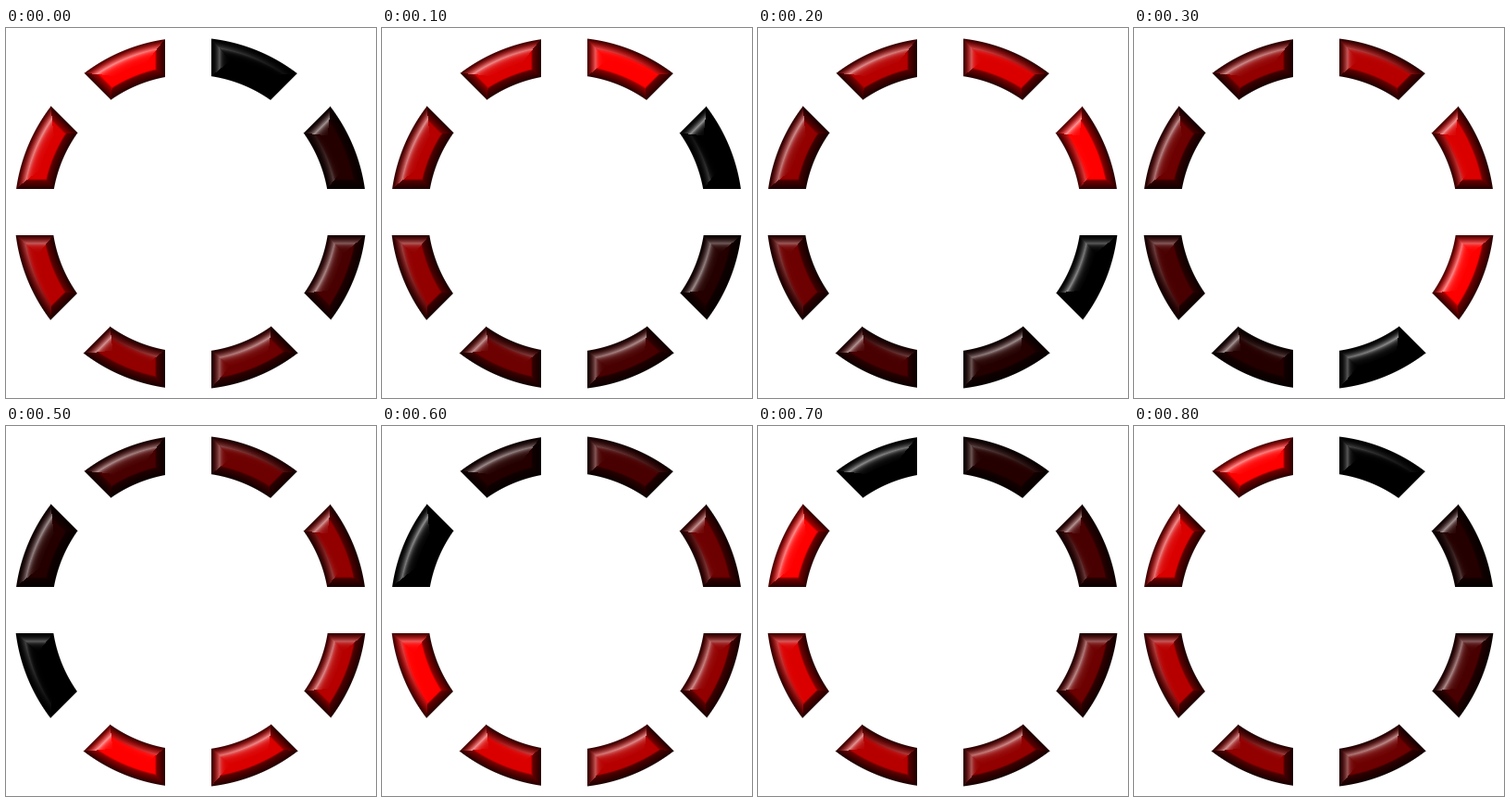
Write an HTML page with a canvas that moves like this. It is 400 px wide and 400 px high and loops after 900 ms.

```html
<!DOCTYPE html>
<html lang="en">
<head>
<meta charset="utf-8">
<title>Ring spinner</title>
<style>
  html, body { margin: 0; width: 100%; height: 100%; overflow: hidden; background: #fff; }
  canvas { display: block; width: 400px; height: 400px; }
</style>
</head>
<body>
<canvas id="stage" width="400" height="400"></canvas>
<script>
const SIZE = 400, COUNT = 8, STEP_MS = 100, LOOP_MS = 900;
const CX = 199.5, CY = 200.5, OUTER = 190.3, INNER = 150;
const BEVEL = 9;
const LIGHT = [-Math.SQRT1_2, -Math.SQRT1_2];

const ctx = document.getElementById('stage').getContext('2d');
const image = ctx.createImageData(SIZE, SIZE);
const clamp = v => Math.max(0, Math.min(1, v));

// Spokes of empty space between the segments, clockwise from the top.
const offsets = [197, 282.6, 199, 0];
const spokes = Array.from({ length: COUNT }, (_, i) => {
  const a = i * Math.PI / 4;
  return {
    nx: Math.cos(a), ny: Math.sin(a),
    offset: offsets[i % 4] * (i < 4 ? 1 : -1),
    half: i % 2 ? 25.3 : 25
  };
});

// Nearest edge of a segment: distance inward and how far it faces the light.
function nearestEdge(x, y, i) {
  const dx = x - CX, dy = y - CY, radius = Math.hypot(dx, dy);
  const a = spokes[i], b = spokes[(i + 1) % COUNT];
  const facing = (nx, ny) => nx * LIGHT[0] + ny * LIGHT[1];
  const radial = facing(dx / radius, dy / radius);
  const edges = [
    [OUTER - radius, radial],
    [radius - INNER, -radial],
    [a.nx * x + a.ny * y - a.offset - a.half, -facing(a.nx, a.ny)],
    [b.offset - b.nx * x - b.ny * y - b.half, facing(b.nx, b.ny)]
  ];
  return edges.reduce((best, edge) => edge[0] < best[0] ? edge : best);
}

function bevel(depth, facing) {
  const lit = Math.max(0, facing), shade = Math.max(0, -facing);
  const t = clamp(depth / BEVEL), past = Math.max(0, depth - BEVEL);
  const gloss = 0.58 * Math.pow(lit, 1.4);
  const crease = 0.38 * (1 - lit) + 0.22 * shade;
  const dark = past > 0
    ? crease * clamp(1 - past / 2)
    : 0.85 - 0.12 * lit + (crease - 0.85 + 0.12 * lit) * t;
  const white = past > 0
    ? gloss * Math.exp(-past / (1 + 2.2 * lit))
    : gloss * t * t;
  return { keep: 1 - dark, white };
}

const pixels = [];
for (let row = 0; row < SIZE; row++) {
  for (let col = 0; col < SIZE; col++) {
    const x = col + 0.5, y = row + 0.5;
    const angle = Math.atan2(x - CX, CY - y) + 2 * Math.PI;
    const segment = Math.floor(angle / (Math.PI / 4)) % COUNT;
    const [depth, facing] = nearestEdge(x, y, segment);
    if (depth <= -0.5) continue;
    pixels.push({
      at: 4 * (row * SIZE + col), segment,
      cover: 255 * clamp(depth + 0.5),
      ...bevel(Math.max(0, depth), facing)
    });
  }
}

function draw(step) {
  for (const p of pixels) {
    const red = 255 * ((p.segment - step + COUNT) % COUNT) / (COUNT - 1);
    const glow = 255 * p.white;
    image.data[p.at] = red * p.keep * (1 - p.white) + glow;
    image.data[p.at + 1] = glow;
    image.data[p.at + 2] = glow;
    image.data[p.at + 3] = p.cover;
  }
  ctx.putImageData(image, 0, 0);
}

// The first pose returns for the ninth step, so it is held twice as long.
const start = performance.now();
let shown = 0;
draw(shown);
function tick() {
  const time = (performance.now() - start) % LOOP_MS;
  const step = Math.floor(time / STEP_MS) % COUNT;
  if (step !== shown) draw(shown = step);
  requestAnimationFrame(tick);
}
requestAnimationFrame(tick);
</script>
</body>
</html>
```
